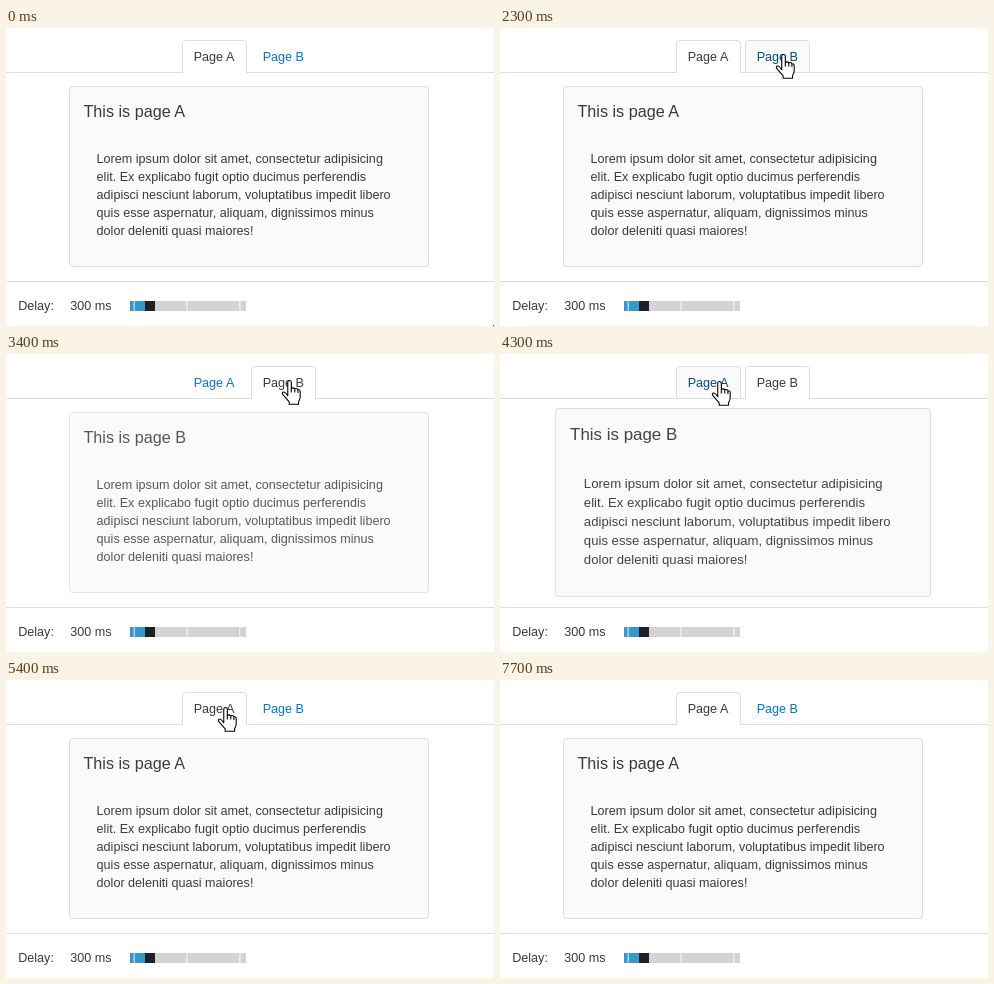
An HTML page that plays this animation: 488x298 px, repeating every 8400 ms.

```html
<!DOCTYPE html>
<html lang="en">
<head>
<meta charset="utf-8">
<title>Page transition</title>
<style>
  html, body { margin: 0; width: 100%; height: 100%; overflow: hidden; background: #fff; }
  svg { display: block; }
  text { font: 12.6px "Liberation Sans", Arial, sans-serif; fill: #373a3c; white-space: pre; }
  .title { font-size: 16.2px; }
  .line { fill: none; stroke: #ddd; }
  .tab .frame { fill: none; stroke: none; }
  .tab text { fill: #0275d8; }
  .tab.hover .frame { fill: #fafafa; stroke: #ddd; }
  .tab.hover text { fill: #014c8c; }
  .tab.active .frame { fill: #fff; stroke: #ddd; }
  .tab.active text { fill: #373a3c; }
  .tab.active .line { display: none; }
  #cursor path { fill: #fff; stroke: #000; stroke-linejoin: round; }
</style>
</head>
<body>
<svg width="488" height="298" viewBox="0 0 488 298">
  <path class="line" d="M0 44.5H488M0 253.5H488"/>
  <g class="tab" transform="translate(176 12)">
    <path class="frame" d="M.5 33V4Q.5 .5 4 .5H61Q64.5 .5 64.5 4V33"/>
    <path class="line" d="M0 32.5H65"/>
    <text x="11.7" y="21">Page A</text>
  </g>
  <g class="tab" transform="translate(245 12)">
    <path class="frame" d="M.5 33V4Q.5 .5 4 .5H61Q64.5 .5 64.5 4V33"/>
    <path class="line" d="M0 32.5H65"/>
    <text x="11.7" y="21">Page B</text>
  </g>

  <text x="12.2" y="282">Delay:</text>
  <text x="64.2" y="282">300 ms</text>
  <rect x="124" y="273" width="116" height="10" fill="#d3d3d3"/>
  <rect x="124" y="273" width="15" height="10" fill="#3598cb"/>
  <path d="M128.2 273v10M181 273v10M233.8 273v10" stroke="#fff" stroke-width="1.5" opacity=".6"/>
  <rect x="139" y="273" width="10" height="10" fill="#202124"/>

  <g id="card">
    <rect x="63.5" y="58.5" width="359" height="180" rx="3.1" fill="#fafafa" stroke="#ddd"/>
    <text class="title" id="title" x="77.4" y="89"></text>
    <text id="body"></text>
  </g>

  <g id="cursor">
    <path id="arrow" d="M.5 .5V16.6L4.3 13L6.9 18.6L9.2 17.6L6.7 12.2H11.8Z"/>
    <g id="hand" transform="translate(-.7 -1) scale(1.08)">
      <path d="M-.5 14.5V2.2Q-.5 .5 1.1 .5Q2.8 .5 2.8 2.2V7.8Q4.8 6.6 6 8.2Q7.9 7.3 8.9 9Q11 8.7 11 11V15.5Q11 18 9.5 20V22.5H.8V20.2L-5 13.6Q-6.2 11.8 -4.6 11.2Q-3.2 10.8 -.5 14.5Z"/>
      <path d="M2.8 7.8V11.5M6 8.2V11.5M8.9 9V12" style="fill:none"/>
    </g>
  </g>
</svg>
<script>
const LOOP = 8400, FADE = 620, CENTER = [243, 148.5];
const CLICKS = [2443, 4257];
const LINES = [
  "Lorem ipsum dolor sit amet, consectetur adipisicing",
  "elit. Ex explicabo fugit optio ducimus perferendis",
  "adipisci nesciunt laborum, voluptatibus impedit libero",
  "quis esse aspernatur, aliquam, dignissimos minus",
  "dolor deleniti quasi maiores!"
];
// Pointer path: time, x, y
const PATH = [
  [0, 487, 297], [300, 487, 297], [700, 469, 291], [800, 469, 291],
  [1700, 268, 70], [1900, 285, 18], [2100, 285, 18], [2300, 283, 27],
  [3700, 283, 27], [3900, 219, 28], [7200, 219, 28], [7650, 34, 320], [LOOP, 34, 320]
];

const $ = id => document.getElementById(id);
const tabs = [...document.querySelectorAll(".tab")];

LINES.forEach((line, i) => {
  const span = document.createElementNS("http://www.w3.org/2000/svg", "tspan");
  span.setAttribute("x", 90.6);
  span.setAttribute("y", 135 + 18 * i);
  span.textContent = line;
  $("body").append(span);
});

// cubic-bezier(.25, .1, .25, 1)
function ease(x) {
  if (x <= 0) return 0;
  if (x >= 1) return 1;
  let low = 0, high = 1, s;
  for (let i = 0; i < 24; i++) {
    s = (low + high) / 2;
    if (.75 * s * (1 - s) + s ** 3 < x) low = s; else high = s;
  }
  return .3 * s * (1 - s) ** 2 + 3 * s * s * (1 - s) + s ** 3;
}

function pointerAt(t) {
  const i = PATH.findIndex(key => key[0] > t);
  const [t0, x0, y0] = PATH[i - 1], [t1, x1, y1] = PATH[i];
  const k = (t - t0) / (t1 - t0);
  return [x0 + (x1 - x0) * k, y0 + (y1 - y0) * k];
}

function draw(t) {
  const second = t >= CLICKS[1];
  const since = t - CLICKS[second ? 1 : 0];
  const leaving = since >= 0 && since < FADE;
  const page = (since >= FADE) !== second ? 1 : 0;
  const out = leaving ? ease(since / FADE) : 0;
  const scale = 1 + .8 * out;
  const opacity = since < 0 ? 1 : leaving ? 1 - out : ease(since / FADE - 1);

  const [cx, cy] = CENTER;
  $("title").textContent = "This is page " + "AB"[page];
  $("card").setAttribute("transform", `translate(${cx} ${cy}) scale(${scale}) translate(${-cx} ${-cy})`);
  $("card").setAttribute("opacity", opacity);

  const [x, y] = pointerAt(t);
  const over = [176, 245].findIndex(left => x >= left && x < left + 65 && y >= 12 && y < 45);
  tabs.forEach((tab, i) => {
    tab.classList.toggle("active", i === page);
    tab.classList.toggle("hover", i !== page && i === over);
  });

  // The enlarged card covers the tabs, so the pointer falls back to an arrow.
  const covered = y > cy - 90.5 * scale;
  const hand = over >= 0 && !covered;
  $("hand").style.display = hand ? "" : "none";
  $("arrow").style.display = hand ? "none" : "";
  $("cursor").setAttribute("transform", `translate(${Math.round(x)} ${Math.round(y)})`);
}

function frame() {
  draw(performance.now() % LOOP);
  requestAnimationFrame(frame);
}
frame();
</script>
</body>
</html>
```
